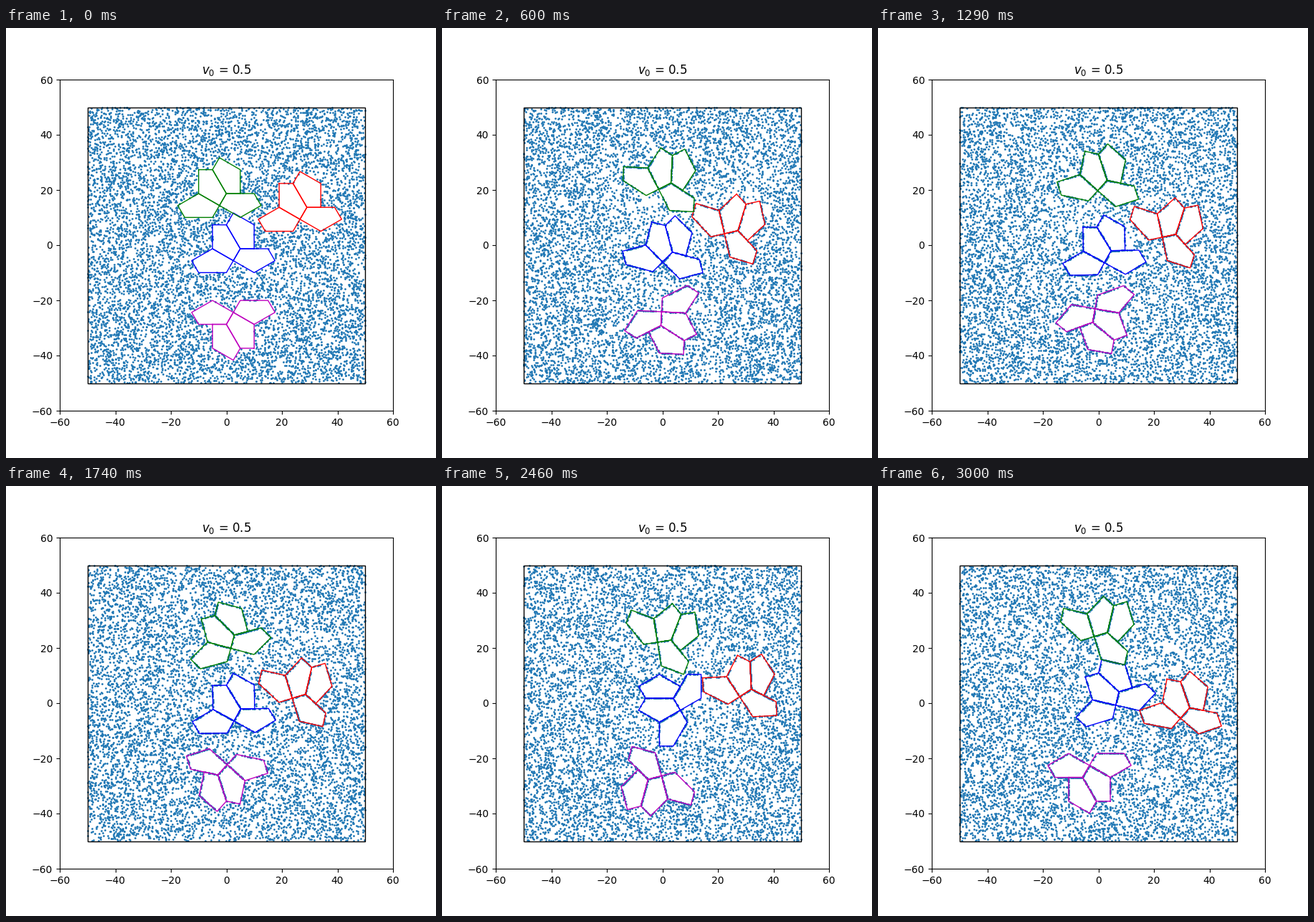
Write a matplotlib script that moves like this. It is 600 by 600 pixels and loops after 3.03 s.

```python
import numpy as np
import matplotlib.pyplot as plt
from matplotlib.animation import FuncAnimation

FRAMES, STEP = 101, 30
WALL, COUNT = 50, 10000
SPEED, TURN = 1.5, 0.9

TURN_TIMES = [0, 20, 43, 58, 69, 82, 100]
MOVE_TIMES = [0, 20, 69, 82, 100]

# colour: (waypoints of the centre, angles in degrees)
BODIES = {
    "b": ([2.5-1.3j, 1.2-1.9j, 3.1-2.2j, 2.7-0.4j, 5+3.4j],
          [0, -15, 1, 1, 14, 60, 17]),
    "r": ([26.5+13.7j, 25.5+7.1j, 27+4.3j, 29.8+6.2j, 30.4-1.2j],
          [0, -47, -48, -43, -60, -27, -11]),
    "g": ([-2.5+18.7j, 1+23.9j, 0.3+24.1j, 1.6+24.8j, 1.4+27.3j],
          [0, -33, -12, 15, -24, -51, -43]),
    "m": ([2.5-28.7j, 1.7-28j, -1.3-26.1j, -3.4-29.4j, -3.2-26.9j],
          [180, 207, 200, 168, 165, 135, 180]),
}


def turn(deg):
    return np.exp(1j * np.radians(deg))


def make_body():
    """Four copies of one pentagon, as complex corners, clockwise."""
    r3 = np.sqrt(3)
    sides = 5 * np.array([1, 2, 1, r3]) * turn(np.array([0, -60, -120, 150]))
    tile = -7.5 + 5j * r3 + np.concatenate([[0], np.cumsum(sides)])
    hub = tile[3]
    wing = hub + (tile - tile[0]) * turn(60)
    return np.array([tile, tile[1] + tile[2] - tile, wing, 2 * hub - wing])


BODY = make_body()
TIME = np.arange(FRAMES)
CENTERS = [np.interp(TIME, MOVE_TIMES, way) for way, _ in BODIES.values()]
SPINS = [turn(np.interp(TIME, TURN_TIMES, deg)) for _, deg in BODIES.values()]


def place(body, frame):
    return CENTERS[body][frame] + BODY * SPINS[body][frame]


def edge_distance(points, poly):
    """Nearest edge's signed distance (negative inside) and outward normal."""
    edge = np.roll(poly, -1) - poly
    normal = 1j * edge / abs(edge)
    dist = ((points[:, None] - poly) * normal.conj()).real
    k = dist.argmax(axis=1)
    return dist[np.arange(len(points)), k], normal[k]


def push_out(points, frame):
    for body in range(len(BODIES)):
        near = abs(points - CENTERS[body][frame]) < 17
        local = points[near]
        for poly in place(body, frame):
            dist, normal = edge_distance(local, poly)
            local -= np.minimum(dist, 0) * normal
        points[near] = local


def wrap(x):
    return (x + WALL) % (2 * WALL) - WALL


def simulate():
    rng = np.random.default_rng(4)
    x, y = rng.uniform(-WALL, WALL, (2, COUNT))
    pos = x + 1j * y
    for body in range(len(BODIES)):
        for poly in place(body, 0):
            pos = pos[edge_distance(pos, poly)[0] > 0]
    heading = rng.uniform(0, 360, len(pos))
    history = [pos]
    for frame in range(1, FRAMES):
        heading += np.degrees(rng.normal(0, TURN, len(pos)))
        pos = pos + SPEED * turn(heading)
        pos = wrap(pos.real) + 1j * wrap(pos.imag)
        push_out(pos, frame)
        history.append(pos)
    return history


history = simulate()

fig, ax = plt.subplots(figsize=(6, 6), dpi=100)
ax.set(xlim=(-60, 60), ylim=(-60, 60))
ax.set_title("$v_0$ = 0.5")
dots, = ax.plot([], [], ".", ms=2, color="C0")
ax.add_patch(plt.Rectangle((-WALL, -WALL), 2 * WALL, 2 * WALL, fill=False,
                           lw=1, zorder=3))
outlines = [[ax.plot([], [], color, lw=1)[0] for _ in BODY]
            for color in BODIES]


def draw(frame):
    dots.set_data(history[frame].real, history[frame].imag)
    for body, lines in enumerate(outlines):
        for line, poly in zip(lines, place(body, frame)):
            loop = np.append(poly, poly[0])
            line.set_data(loop.real, loop.imag)
    return [dots] + sum(outlines, [])


anim = FuncAnimation(fig, draw, frames=FRAMES, interval=STEP, repeat=True,
                     repeat_delay=0)
plt.show()
```
